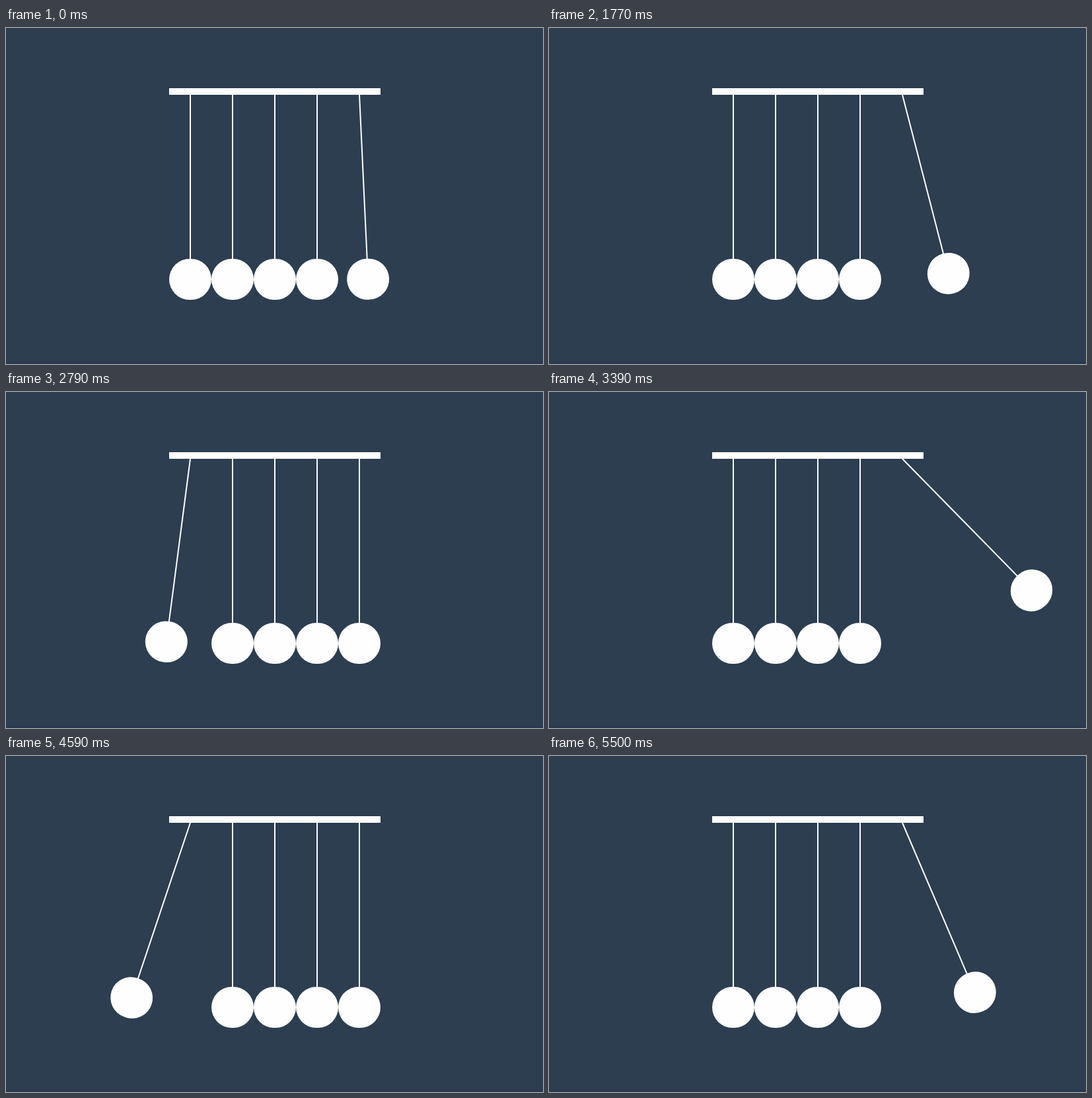
An HTML page for the animation above (5600 ms loop, 813 by 508 pixels).

```html
<!DOCTYPE html>
<html lang="en">
<head>
<meta charset="utf-8">
<title>Pendulum cradle</title>
<style>
  html, body { margin: 0; width: 100%; height: 100%; overflow: hidden; background: #2c3e50; }
  svg { display: block; }
</style>
</head>
<body>
<svg width="813" height="508" viewBox="0 0 813 508" fill="#fefefe">
  <defs>
    <g id="pendulum">
      <rect x="-1" width="2" height="250"/>
      <rect x="-32" y="248" width="64" height="62" rx="31"/>
    </g>
  </defs>
  <rect y="505" width="813" height="3" fill="#293a50"/>
  <use id="left" href="#pendulum"/>
  <use href="#pendulum" x="343" y="101"/>
  <use href="#pendulum" x="407" y="101"/>
  <use href="#pendulum" x="471" y="101"/>
  <use id="right" href="#pendulum"/>
  <rect x="247" y="91" width="320" height="10" fill="#fff"/>
</svg>
<script>
const LOOP = 5600, HOLD_START = 260, HOLD_END = 5500;
const SWING = 953, OFFSET = 3, PEAK = 50; // ms per swing, lag in ms, degrees
const left = document.getElementById('left');
const right = document.getElementById('right');

// Swings since the loop began: even ones go left, odd ones go right.
function swingsAt(t) {
  if (t < HOLD_START) return 1.973; // at rest, just before the right ball lands
  return (Math.min(t, HOLD_END) - OFFSET) / SWING;
}

function pose(ball, x, angle) {
  ball.setAttribute('transform', `translate(${x} 101) rotate(${angle})`);
}

function draw(t) {
  const swings = swingsAt(t);
  const angle = PEAK * (1 - Math.abs(swings % 1 * 2 - 1)); // steady out and back
  const goesLeft = Math.floor(swings) % 2 === 0;
  pose(left, 279, goesLeft ? angle : 0);
  pose(right, 535, goesLeft ? 0 : -angle);
}

const start = performance.now();
function tick() {
  draw((performance.now() - start) % LOOP);
  requestAnimationFrame(tick);
}
tick();
</script>
</body>
</html>
```
